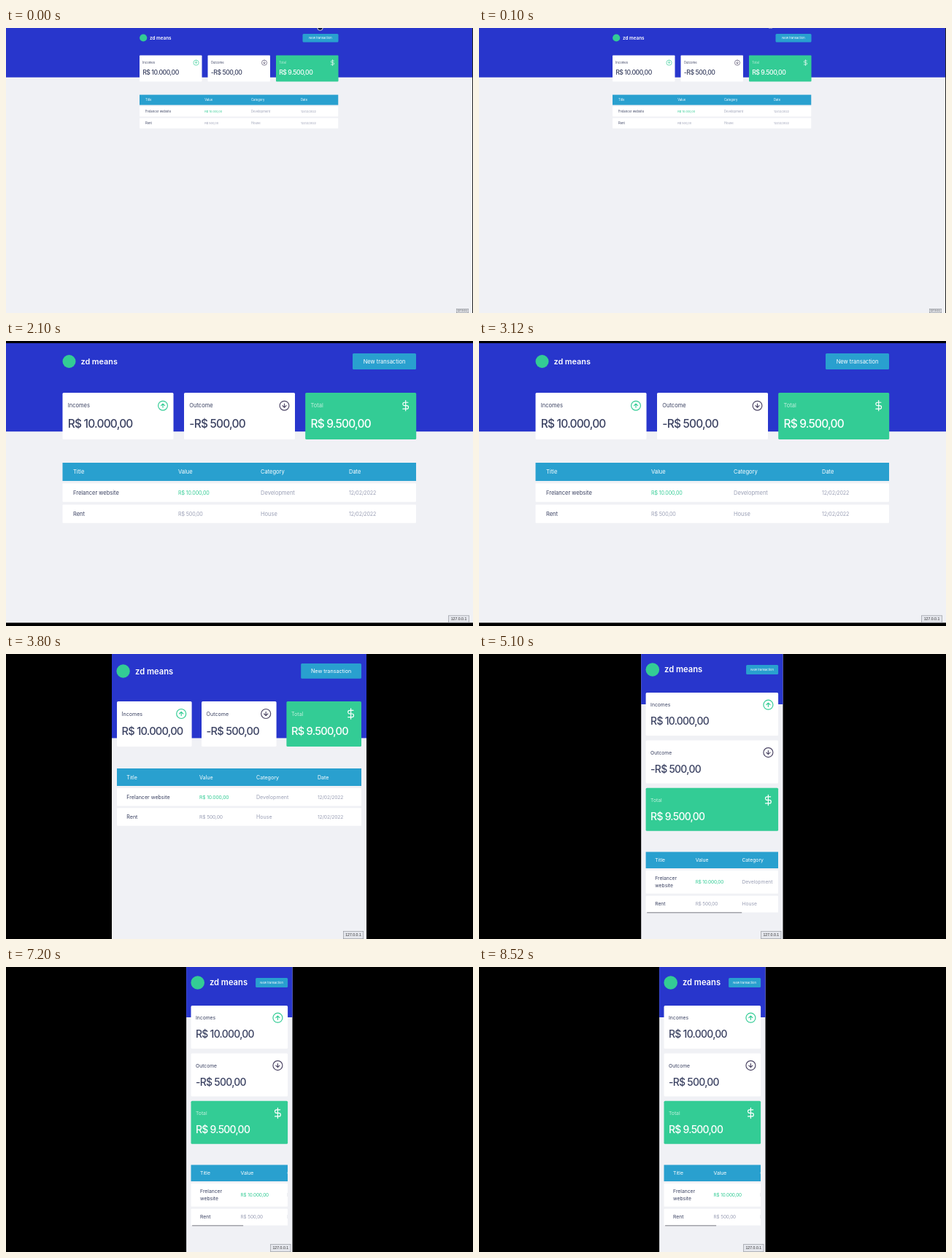
Recreate the animation shown at these times as an HTML page. Size 640 px wide and 391 px high, loop 9.4 s.

```html
<!DOCTYPE html>
<html lang="en">
<head>
<meta charset="utf-8">
<title>Finance dashboard at several widths</title>
<style>
  html, body { margin: 0; width: 100%; height: 100%; overflow: hidden; background: #000; }
  svg { display: block; width: 100%; height: 100%; font-family: Inter, sans-serif; white-space: pre; }
  .num { letter-spacing: -.02em; }
  .big { letter-spacing: -.05em; font-weight: 500; }
  .tip { font-family: "Liberation Sans", Arial, sans-serif; }
</style>
</head>
<body>
<svg id="stage" viewBox="0 0 640 391"></svg>
<script>
const BLUE = '#2836cc', BG = '#f0f1f5', GREEN = '#33cc95', SKY = '#29a0cf',
      DARK = '#3b4262', GREY = '#9a9fb5', WHITE = '#fff', PLUM = '#4d4665';

const rect = (x, y, w, h, fill, rx = 0) =>
  `<rect x="${x}" y="${y}" width="${w}" height="${h}" rx="${rx}" fill="${fill}"/>`;
const text = (x, y, size, str, fill, extra = '') =>
  `<text x="${x}" y="${y}" font-size="${size}" fill="${fill}" ${extra}>${str}</text>`;

const RING = 'M12 2a10 10 0 0 1 0 20a10 10 0 0 1 0-20';
const ICONS = [
  RING + 'M16 12l-4-4-4 4M12 16V8',
  RING + 'M8 12l4 4 4-4M12 8v8',
  'M12 1v22M17 5H9.5a3.5 3.5 0 0 0 0 7h5a3.5 3.5 0 0 1 0 7H6'
];
const icon = (i, x, y, r, color) =>
  `<path d="${ICONS[i]}" transform="translate(${x} ${y}) scale(${r / 10}) translate(-12 -12)"
    fill="none" stroke="${color}" stroke-width="1.8" stroke-linecap="round" stroke-linejoin="round"/>`;

const CARDS = [
  ['Incomes', 'R$ 10.000,00', WHITE, DARK, DARK, GREEN],
  ['Outcome', '-R$ 500,00', WHITE, DARK, DARK, PLUM],
  ['Total', 'R$ 9.500,00', GREEN, '#c3f0de', WHITE, WHITE]
];
const HEADS = ['Title', 'Value', 'Category', 'Date'];
const ROWS = [
  ['Frelancer website', 'R$ 10.000,00', 'Development', '12/02/2022'],
  ['Rent', 'R$ 500,00', 'House', '12/02/2022']
];

function card(p, i) {
  const [label, value, fill, labelInk, valueInk, iconInk] = CARDS[i];
  const [x, y] = p.cards[i], { w, h, pad, labelY, valueY, iconX, iconY, r } = p.card;
  return rect(x, y, w, h, fill, r / 4) +
    text(x + pad, y + labelY, p.size, label, labelInk) +
    text(x + pad, y + valueY, p.size * 2.06, value, valueInk, 'class="big"') +
    icon(i, x + iconX, y + iconY, r, iconInk);
}

function row(p, i) {
  const [y, h, base] = p.rows[i], s = p.size;
  const cells = ROWS[i].map((str, c) => {
    const x = p.cols[c];
    if (x === undefined) return '';
    if (c === 0) {
      const lines = p.wrap ? str.split(' ') : [str];
      return lines.map((line, n) =>
        text(x, base + (n - (lines.length - 1) / 2) * 9.6, s, line, DARK)).join('');
    }
    const ink = c === 1 && i === 0 ? GREEN : GREY;
    return c === 2 ? text(x, base, s, str, ink) : text(x, base, s * .95, str, ink, 'class="num"');
  });
  return rect(p.left, y, p.width, h, WHITE, 1) + cells.join('');
}

function page(p) {
  const [px, py, pw, ph] = p.page, [lx, ly, lr] = p.logo, [bx, by, bw, bh] = p.button;
  const [hy, hh, hBase] = p.head, [tx, ty, tw, th, ts] = p.tip;
  return rect(px, py, pw, ph, BG) + rect(px, py, pw, p.blue - py, BLUE) +
    `<circle cx="${lx}" cy="${ly}" r="${lr}" fill="${GREEN}"/>` +
    text(p.brand[0], p.brand[1], p.brand[2], 'zd means', WHITE, 'font-weight="600"') +
    rect(bx, by, bw, bh, SKY, 1.5) +
    text(bx + bw / 2, p.buttonText[0], p.buttonText[1], 'New transaction', WHITE, 'text-anchor="middle"') +
    CARDS.map((_, i) => card(p, i)).join('') +
    `<svg width="${p.left + p.width}" height="391" viewBox="0 0 ${p.left + p.width} 391">` +
    rect(p.left, hy, p.width, hh, SKY) +
    p.cols.map((x, i) => text(x, hBase, p.size, HEADS[i], WHITE)).join('') +
    ROWS.map((_, i) => row(p, i)).join('') + '</svg>' +
    (p.scroll ? rect(px + 8, 354, p.scroll, 1.5, '#a3a4aa') : '') +
    rect(tx, ty, tw, th, '#8d9097') + rect(tx + .6, ty + .6, tw - 1.2, th - 1.2, '#e4e6ec') +
    text(tx + tw / 2, ty + th / 2 + ts * .36, ts, '127.0.0.1', '#333', 'text-anchor="middle" class="tip"');
}

const wide = page({
  page: [0, 0, 639, 391], blue: 67.7, size: 4.2, logo: [188.2, 13.5, 5.1], brand: [197, 15.8, 6.35],
  button: [406.5, 8, 49, 11.5], buttonText: [15.2, 4.1],
  cards: [[183, 37.6], [276.5, 37.6], [370, 37.6]],
  card: { w: 85.5, h: 35.9, pad: 4.2, labelY: 11.6, valueY: 26.7, iconX: 77.5, iconY: 10, r: 3.6 },
  left: 183, width: 272.5, head: [91.6, 14, 100.1], cols: [191, 272.3, 336, 404],
  rows: [[107.5, 14, 116], [123.6, 14.2, 132.3]], tip: [617, 385, 17, 6, 3.2]
});

const laptop = page({
  page: [0, 3, 640, 383.5], blue: 124.2, size: 7.5, logo: [86.5, 28, 9], brand: [102.5, 32, 10.8],
  button: [475, 17, 87, 22], buttonText: [30.7, 7.5],
  cards: [[77.5, 71], [244, 71], [410.2, 71]],
  card: { w: 152, h: 64, pad: 7.3, labelY: 20.3, valueY: 48, iconX: 137.5, iconY: 17.7, r: 6.4 },
  left: 77.5, width: 484.5, head: [167, 25, 182.1], cols: [92, 236, 349, 470],
  rows: [[195.3, 25.5, 210.8], [224.5, 25.3, 239.7]], tip: [606, 376.5, 29, 10, 5.2]
});

const tablet = page({
  page: [145, 0, 349, 391], blue: 115.4, size: 7.1, logo: [160.6, 23.5, 9.2], brand: [177, 27.5, 11.2],
  button: [404.2, 13, 82.8, 20.7], buttonText: [26, 7.2],
  cards: [[152, 65], [268, 65], [384.4, 65]],
  card: { w: 102.6, h: 62, pad: 6.6, labelY: 19.7, valueY: 46, iconX: 88.2, iconY: 17, r: 6.5 },
  left: 152, width: 335, head: [157, 24, 171.7], cols: [165.3, 265, 343, 427],
  rows: [[184, 24.5, 199], [211.2, 24.5, 226.2]], tip: [462, 380, 28, 11, 5.2]
});

function phone(x, w, scroll) {
  const left = x + 6.4, width = w - 12.8;
  return page({
    page: [x, 0, w, 391], blue: 69, size: 6.75, logo: [x + 15.6, 21.5, 9.3], brand: [x + 31.8, 25.3, 11.2],
    button: [left + width - 44, 15, 44, 13], buttonText: [23, 4.1],
    cards: [53, 118.4, 183.7].map(y => [left, y]),
    card: { w: width, h: 59.1, pad: 6.5, labelY: 19.2, valueY: 44.4, iconX: width - 13.7, iconY: 16.7, r: 6.5 },
    left, width, head: [271.5, 22.5, 285.1], cols: [19, 74.5, 138.2].map(d => x + d), wrap: true,
    rows: [[296.7, 32, 315.2], [331.8, 22.8, 345.4]], scroll, tip: [x + w - 30.2, 380, 28, 11, 5.2]
  });
}

const edge = rect(639, 0, 1, 391, '#222');
const scenes = [
  [0, wide + edge + '<circle cx="430.5" cy="-.5" r="3.8" fill="#111a4a" stroke="#fff" stroke-width=".8"/>'],
  [100, wide + edge + rect(397, 0, 5, 1, '#7a80c8')],
  [2100, laptop],
  [3800, tablet],
  [5100, phone(222.2, 194.3, 130)],
  [6000, phone(234.3, 170.2, 98)],
  [7200, phone(247.1, 145.4, 70)]
];

const stage = document.getElementById('stage');
const start = performance.now();
let shown;
function tick() {
  const t = (performance.now() - start) % 9400;
  const scene = scenes.findLast(s => s[0] <= t) || scenes[0];
  if (scene !== shown) stage.innerHTML = (shown = scene)[1];
  requestAnimationFrame(tick);
}
tick();
</script>
</body>
</html>
```
